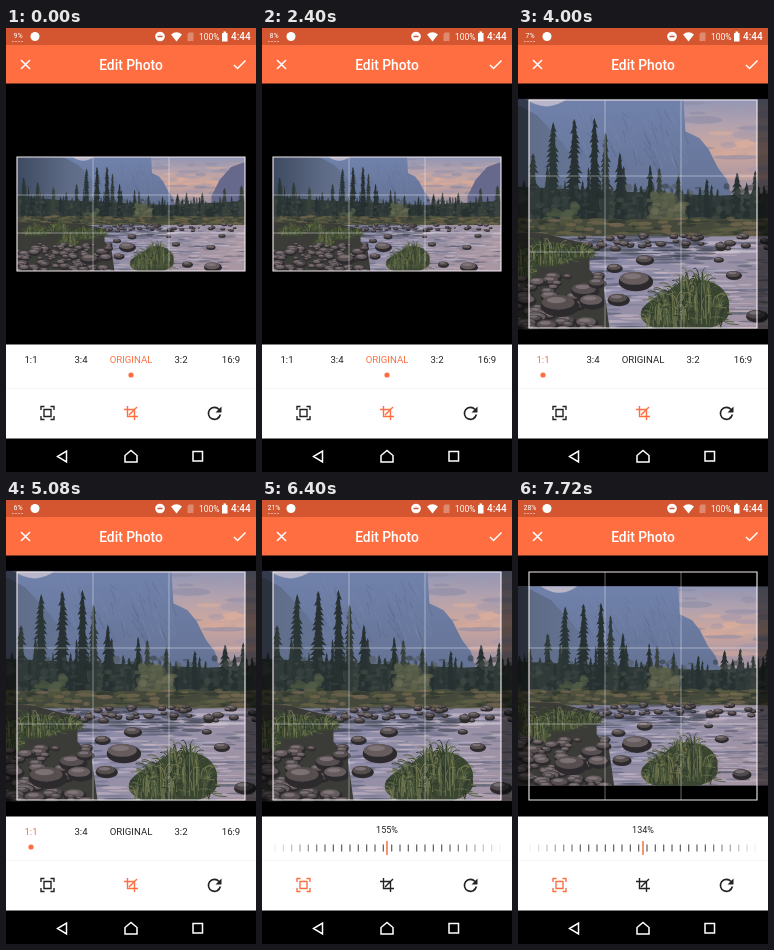
An HTML page that plays this animation: 250x444 px, repeating every 8 s.

```html
<!DOCTYPE html>
<html lang="en">
<head>
<meta charset="utf-8">
<title>Photo editor</title>
<style>
  html, body { margin: 0; width: 100%; height: 100%; overflow: hidden; background: #000; }
  svg { display: block; width: 250px; height: 444px; font-family: Roboto, sans-serif; }
  .tabs text { font-size: 9.6px; text-anchor: middle; fill: #222; }
  .icon { fill: none; stroke: #222; stroke-width: 1.4; }
  .tabs text.on { fill: #ff6e40; }
  .icon.on { stroke: #ff6e40; }
  .white { fill: none; stroke: #fff; stroke-width: 1.5; }
</style>
</head>
<body>
<svg viewBox="0 0 250 444">
  <defs>
    <linearGradient id="sky" x2="0" y2="1">
      <stop offset="0" stop-color="#9196b5"/><stop offset=".2" stop-color="#b3a2ad"/>
      <stop offset=".38" stop-color="#cda79d"/><stop offset=".65" stop-color="#a594a3"/>
    </linearGradient>
    <linearGradient id="cliff" x2="0" y2="1">
      <stop offset="0" stop-color="#7081ab"/><stop offset=".6" stop-color="#677699"/><stop offset="1" stop-color="#5f6c8c"/>
    </linearGradient>
    <linearGradient id="hill" x2="1">
      <stop offset="0" stop-color="#3e4a60"/><stop offset=".6" stop-color="#5f6c87"/><stop offset="1" stop-color="#677699"/>
    </linearGradient>
    <linearGradient id="river" x2="1" y2=".25">
      <stop offset="0" stop-color="#5f6478"/><stop offset=".5" stop-color="#8e8ca8"/><stop offset="1" stop-color="#a897a3"/>
    </linearGradient>
    <clipPath id="bounds"><path d="M-103 72H353V300H-103Z"/></clipPath>
    <clipPath id="stage"><path d="M0 55H250V317H0Z"/></clipPath>
  </defs>

  <g clip-path="url(#stage)">
    <g id="photo" clip-path="url(#bounds)"></g>
    <path id="dim" fill-opacity=".55" fill-rule="evenodd"/>
    <path id="grid" fill="none" stroke="#fff" stroke-opacity=".5" stroke-width=".8"/>
    <path id="frame" fill="none" stroke="#f4ecf0" stroke-width="1.1"/>
  </g>

  <path fill="#d35630" d="M0 0H250V18H0Z"/>
  <path fill="#ff6e40" d="M0 17H250V55.400H0Z"/>
  <g fill="#fff">
    <text id="load" x="12" y="10" font-size="7" text-anchor="middle"></text>
    <path d="M6 13.500h12" stroke="#fff" stroke-opacity=".6" stroke-width=".8" stroke-dasharray="2 1"/>
    <circle cx="29" cy="8.500" r="4.500"/>
    <circle cx="154" cy="8.500" r="4.800"/>
    <path d="M151.500 8.500h5" stroke="#d35630" stroke-width="1.500"/>
    <path d="M165 6.500Q170.500 2 176 6.500L170.500 13.500Z"/>
    <path d="M183 4.500h4.500v8.500h-6v-7Z" fill-opacity=".3"/>
    <text x="193" y="12" font-size="8.500">100%</text>
    <path d="M216 5h1.500v-1.500h2.500v1.500h1.500v8.500h-5.500Z"/>
    <text x="225" y="12.300" font-size="10" font-weight="500">4:44</text>
    <text x="125" y="41.500" font-size="13.800" font-weight="500" text-anchor="middle">Edit Photo</text>
  </g>
  <path class="white" d="M15 32l9 9m0-9l-9 9M228 37l3.500 3.500 8-8"/>

  <path fill="#fff" d="M0 316.500H250V411H0Z"/>
  <path d="M0 360.500H250" stroke="#f5f5f5"/>
  <path id="press" fill="#f9f9f9" d="M0 317H56V360H0Z"/>
  <g id="ratios" class="tabs">
    <text x="25" y="335">1:1</text><text x="75" y="335">3:4</text><text x="125" y="335">ORIGINAL</text>
    <text x="175" y="335">3:2</text><text x="225" y="335">16:9</text>
    <circle id="dot" cy="347" r="2.600" fill="#ff6e40"/>
  </g>
  <g id="wheel" class="tabs">
    <text id="percent" x="125" y="333" style="font-size:9px"></text>
    <g id="ticks" stroke="#655c5f" stroke-width="1.200"></g>
    <path d="M125 341V355" stroke="#ff6e40" stroke-width="1.500"/>
  </g>
  <g id="scaleIcon" class="icon"><path d="M35 382v-3.500h3.500m6 0h3.500v3.500m0 6v3.500h-3.500m-6 0h-3.500v-3.500M38 381.500h7v7h-7Z"/></g>
  <g id="cropIcon" class="icon"><path d="M121.500 378v10.500h10.500M118 381.500h10.500v10.500M123 387l8-8"/></g>
  <g class="icon"><path stroke-width="1.600" d="M213 381.500a6 6 0 1 0 1.300 5"/><path fill="#222" stroke="none" d="M215.500 378.500v6h-6Z"/></g>

  <path d="M0 410.500H250V444H0Z"/>
  <path class="white" d="M60.500 423v11l-9-5.500ZM119 434v-6.500l6-5 6 5v6.500ZM187 423.500h9.500v9.500h-9.500Z"/>
</svg>
<script>
const $ = id => document.getElementById(id);
let seed = 7;
const rnd = (a, b) => a + (b - a) * ((seed = (seed * 16807) % 2147483647) / 2147483647);
const pick = list => list[Math.floor(rnd(0, list.length))];
const shape = (d, fill, more = '') => `<path d="${d}" fill="${fill}" ${more}/>`;
const oval = (x, y, rx, ry, fill, alpha = 1) =>
  `<ellipse cx="${x}" cy="${y}" rx="${rx}" ry="${ry}" fill="${fill}" fill-opacity="${alpha}"/>`;
const repeat = (n, make) => Array.from({ length: n }, (_, i) => make(i)).join('');
const speckle = (n, x0, x1, y0, y1, width, height, colors, alpha = .5) =>
  repeat(n, () => oval(rnd(x0, x1), rnd(y0, y1), width * rnd(.3, 1), height * rnd(.3, 1), pick(colors), alpha));

function tree(x, top, base, half, fill) {
  const right = [], left = [], layers = Math.ceil((base - top) / 5);
  for (let i = 1; i <= layers; i++) {
    const y = top + (base - top) * i / layers, spread = half * Math.sqrt(i / layers);
    right.push(`${x + spread * rnd(.45, 1.1)} ${y}`, `${x + spread * .4} ${y - 1}`);
    left.unshift(`${x - spread * .4} ${y - 1}`, `${x - spread * rnd(.45, 1.1)} ${y}`);
  }
  return shape(`M${x} ${top}L${right.join('L')}L${left.join('L')}Z`, fill);
}

const rock = (x, y, r) =>
  oval(x, y + r * .12, r, r * .55, '#2d2a2d') +
  oval(x - r * .1, y - r * .08, r * .85, r * .38, pick(['#574e4f', '#665c5e', '#4f4a4e'])) +
  oval(x - r * .2, y - r * .2, r * .5, r * .16, '#8b7f84', .7);

const bush = (x, base, half, height) =>
  oval(x, base - height * .35, half * .85, height * .4, '#3b4632') +
  repeat(Math.round(half * 4), () => {
    const u = rnd(-1, 1), h = height * Math.sqrt(1.05 - u * u) * rnd(.4, 1.05);
    const foot = x + u * half * .7, tip = foot + half * rnd(-.35, .35), y = base - rnd(0, height * .35);
    return shape(`M${foot} ${y}Q${foot} ${base - h} ${tip} ${base - h * .9}`, 'none',
      `stroke="${pick(['#66704a', '#4d5a3b', '#777a52', '#36422f', '#2b3529'])}" stroke-width=".900"`);
  });

function landscape() {
  const greens = ['#2a3536', '#303b39', '#38413c', '#273132'];
  const edge = x => x < -20 ? 118 + (x + 103) * .3 : x < 110 ? 138 : 149;
  return shape('M-103 72H353V205H-103Z', 'url(#sky)') +
    speckle(60, 172, 353, 76, 150, 24, 4, ['#8789a5', '#e0b29a', '#a197ad', '#d8aa9a']) +
    shape('M353 82L325 92 302 118 286 150V195H353Z', '#66698b') +
    shape('M-103 72H165L167 104 181 111 190 122 199 140 208 152 212 165V200H-103Z', 'url(#cliff)') +
    shape('M-103 72H-10L20 88 42 112 72 150V200H-103Z', 'url(#hill)') +
    shape('M8 72Q30 87 50 72Z', '#b9b5c9') +
    repeat(80, () => shape(`M${rnd(55, 168)} ${rnd(78, 135)}l${rnd(2, 8)} ${rnd(6, 18)}`, 'none',
      `stroke="${pick(['#7f8db2', '#53638a'])}" stroke-opacity=".35"`)) +
    shape('M-103 150L-20 158 110 164 200 168 353 160V206H-103Z', '#303a38') +
    repeat(80, i => {
      const x = -103 + i * 5.8;
      return tree(x, edge(x) + rnd(0, 24), 196, rnd(4, 8), pick(greens));
    }) +
    [[16, 126, 10], [36, 95, 11], [57, 92, 11], [77, 91, 11], [88, 105, 9], [102, 125, 9], [132, 137, 7], [141, 140, 7], [160, 147, 7],
     [188, 151, 7], [218, 145, 9], [236, 143, 8], [268, 143, 9], [312, 134, 11], [346, 128, 12], [-90, 113, 12], [-62, 122, 12], [-30, 132, 11]]
      .map(([x, top, half]) => tree(x, top, 200, half, pick(greens))).join('') +
    speckle(260, -103, 353, 158, 195, 5, 4, ['#4d5348', '#232d2c', '#454d45', '#3a4644'], .45) +
    speckle(60, 132, 166, 166, 192, 6, 5, ['#62674f', '#555d48', '#6d6e55'], .6) +
    speckle(30, 28, 58, 176, 198, 6, 5, ['#525c46', '#47523f'], .7) +
    shape('M-103 191H353V211H-103Z', '#45493c') +
    speckle(260, -103, 353, 190, 210, 10, 2.5, ['#646246', '#7a6850', '#2f3830', '#53583f'], .7) +
    shape('M-103 208H353V300H-103Z', 'url(#river)') +
    speckle(330, 50, 353, 212, 299, 20, 1.4, ['#c3bbd0', '#50566c', '#cbbac5', '#70748f'], .55) +
    speckle(70, 60, 190, 208, 232, 16, 1.8, ['#3c4250', '#4a4d5c'], .6) +
    repeat(55, () => rock(rnd(60, 350), rnd(206, 220), rnd(2, 6))) +
    shape('M-103 203L25 205 72 216 72 241 86 257 92 300H-103Z', '#3b3c37') +
    bush(-65, 230, 32, 28) + bush(-20, 222, 25, 23) + bush(30, 237, 32, 31) + bush(0, 253, 24, 38) + bush(62, 230, 19, 18) +
    repeat(110, i => rock(rnd(-103, 84), 246 + i * .5, rnd(4, 12))) +
    [[97, 239, 8], [127, 231, 9], [118, 251, 17], [101, 270, 11], [68, 261, 14], [75, 272, 13], [43, 275, 19], [80, 254, 9],
     [215, 246, 8], [285, 252, 9], [238, 286, 11], [289, 291, 18], [200, 231, 5], [307, 229, 7]]
      .map(r => rock(...r)).join('') +
    bush(168, 300, 50, 50) + bush(178, 297, 38, 62) + bush(150, 299, 32, 40);
}
$('photo').innerHTML = landscape();

const clamp = v => Math.min(1, Math.max(0, v));
const easeInOut = u => u < .5 ? 4 * u ** 3 : 1 - (2 - 2 * u) ** 3 / 2;
const CROP = 2680, SCALE = 5880, DRAG = 7130;
const FIT = 76.5, COVER = 154.6;
const loads = [[0, 9], [1600, 8], [2680, 7], [4280, 6], [5600, 21], [6680, 28]];

// The square crop zooms the photo to cover; a steady drag on the wheel then zooms out.
const zoomAt = t =>
  FIT + (COVER - FIT) * easeInOut(clamp((t - 2560) / 500)) - Math.max(0, t - DRAG) * .035;

function drawTicks(percent) {
  const gap = 25 / 3, start = 11 + (2 + (COVER - percent) * 3.6) % gap;
  let out = '';
  for (let x = start; x < 241; x += gap) {
    const alpha = clamp(Math.min(x - 7, 243 - x) / 57);
    out += `<path d="M${x} 344.500v7" stroke-opacity="${alpha}"/>`;
  }
  $('ticks').innerHTML = out;
}

function render(t) {
  const square = t >= CROP, scaling = t >= SCALE, percent = zoomAt(t);
  $('photo').setAttribute('transform', `translate(125 186) scale(${percent / 153}) translate(-125 -186)`);

  const h = square ? 228 : 114, top = 186 - h / 2;
  const box = `M11 ${top}h228v${h}h-228Z`;
  $('frame').setAttribute('d', box);
  $('dim').setAttribute('d', 'M0 55H250V317H0Z' + box);
  $('grid').setAttribute('d', `M87 ${top}v${h}M163 ${top}v${h}M11 ${top + h / 3}h228M11 ${top + h * 2 / 3}h228`);

  $('load').textContent = loads.filter(l => l[0] <= t).pop()[1] + '%';
  $('press').style.display = square && t < 3480 ? '' : 'none';
  $('ratios').style.display = scaling ? 'none' : '';
  $('wheel').style.display = scaling ? '' : 'none';
  const active = square ? 0 : 2;
  document.querySelectorAll('#ratios text').forEach((el, i) => el.classList.toggle('on', i === active));
  $('dot').setAttribute('cx', 25 + active * 50);
  $('percent').textContent = Math.round(percent) + '%';
  drawTicks(percent);
  $('scaleIcon').classList.toggle('on', scaling);
  $('cropIcon').classList.toggle('on', !scaling);
}

let shown = -1;
function frame() {
  const t = performance.now() % 8000, r = t % 800;
  const step = Math.round(t - r) + (r < 280 ? 0 : r < 520 ? 280 : 520);
  if (step !== shown) render(shown = step);
  requestAnimationFrame(frame);
}
frame();
</script>
</body>
</html>
```
